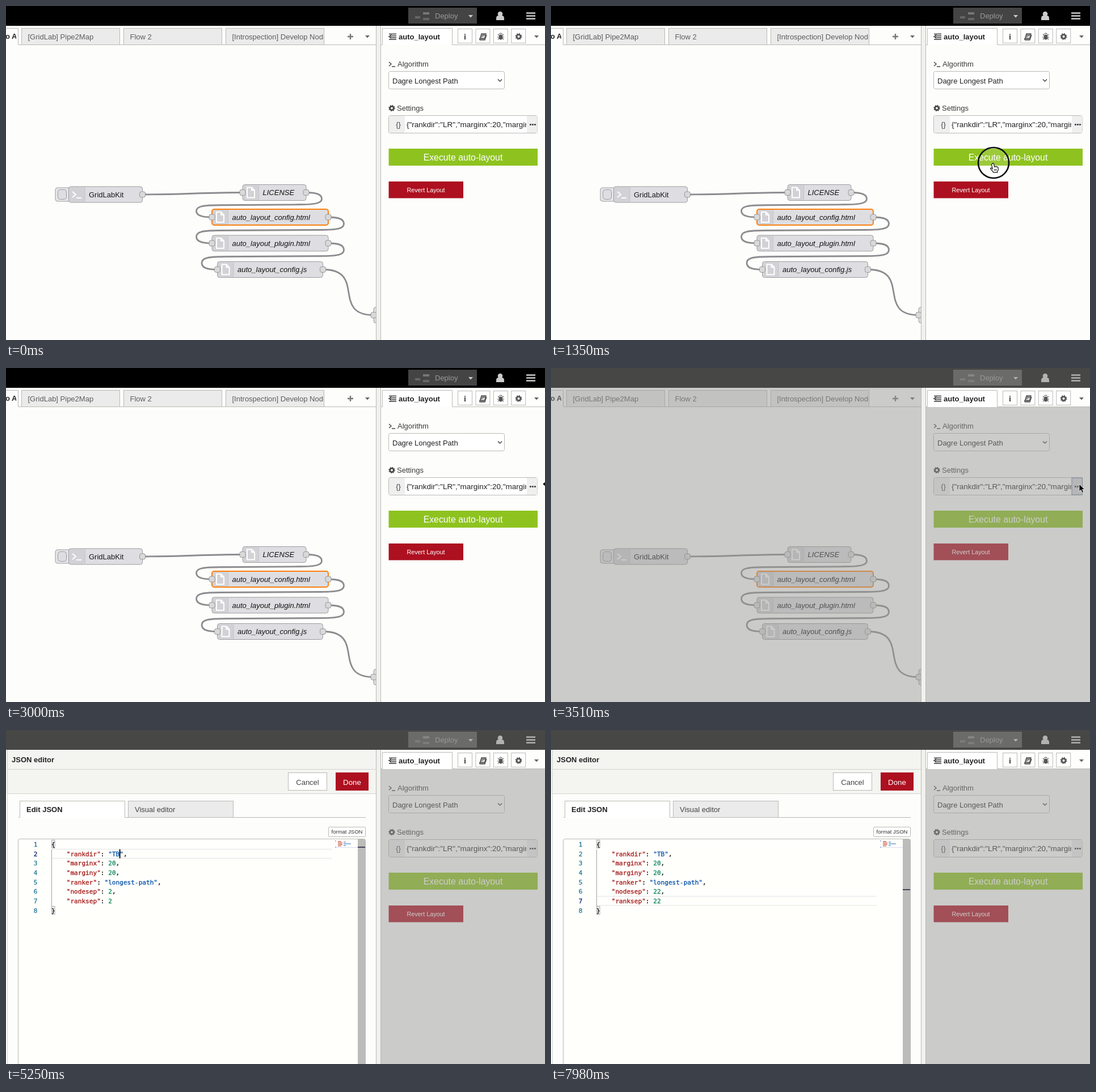
An HTML page for the animation above (8 s loop, 950 by 590 pixels).

```html
<!DOCTYPE html>
<html lang="en">
<head>
<meta charset="utf-8">
<title>Auto layout</title>
<style>
html, body { margin: 0; width: 100%; height: 100%; overflow: hidden; background: #fdfdfb; }
svg { display: block; width: 950px; height: 590px; }
svg svg { width: auto; height: auto; }
text { font: 13px "Liberation Sans", Arial, sans-serif; fill: #3a3a3a; white-space: pre; }
.b { font-weight: bold; fill: #222; }
.n { fill: #1a1a1a; }
.i { font-style: italic; fill: #111; }
.mono text { font: 11.1px "DejaVu Sans Mono", monospace; stroke-width: .3; }
.wire { fill: none; stroke: #8c8c90; stroke-width: 2.8; }
</style>
</head>
<body>
<svg id="stage" viewBox="0 0 950 590"></svg>
<script>
const LOOP = 8000, CHAR = 6.683, ROW = 16.67;
const LINE = '#b9b9b6', PALE = '#ebebeb', NODE = '#dedee2', EDGE = '#9b9b9f', PAPER = '#fdfdfb';
const $ = id => document.getElementById(id);

const rect = (x, y, w, h, fill, stroke = 'none', rx = 0, extra = '') =>
  `<rect x="${x}" y="${y}" width="${w}" height="${h}" fill="${fill}" stroke="${stroke}" rx="${rx}" ${extra}/>`;
const text = (x, y, s, attrs = '') => `<text x="${x}" y="${y}" ${attrs}>${s}</text>`;
const path = (d, stroke, width = 1, fill = 'none', extra = '') =>
  `<path d="${d}" stroke="${stroke}" stroke-width="${width}" fill="${fill}" ${extra}/>`;
const clipped = (x, y, w, h, body) =>
  `<svg x="${x}" y="${y}" width="${w}" height="${h}" style="width:${w}px;height:${h}px">${body}</svg>`;
const size = (px, fill, anchor = 'start') =>
  `style="font-size:${px}px;fill:${fill}" text-anchor="${anchor}"`;
const caretDown = (x, y, fill) => path(`M${x - 4} ${y - 2}h8l-4 4.5z`, 'none', 0, fill);
const gear = (x, y, r, fill) =>
  `<circle cx="${x}" cy="${y}" r="${r * .62}" fill="none" stroke="${fill}" stroke-width="${r * .5}"/>
   <circle cx="${x}" cy="${y}" r="${r * .92}" fill="none" stroke="${fill}" stroke-width="${r * .32}"
     stroke-dasharray="${r * .36}"/>`;

// Flow canvas
const port = (x, y) => rect(x - 5, y - 5, 10, 10, '#d9d9d9', '#97979a', 3);
const fileIcon = (x, y) => path(`M${x - 6} ${y - 9}h8l5 5v13h-13zM${x + 2} ${y - 9}v5h5`, '#fff', 2);

function node(x, y, w, label, icon, cls, stroke = EDGE) {
  return rect(x, y - 14, w, 28, NODE, stroke, 4, `stroke-width="${stroke === EDGE ? 1 : 2}"`) +
    rect(x + 1, y - 13, 28, 26, 'rgba(0,0,0,.05)', 'none', 3) +
    path(`M${x + 28.5} ${y - 13}v26`, '#c5c5c8') + icon +
    text(x + 35.5, y + 4.5, label, `class="${cls}"`) + port(x + w, y);
}

function backWire(x1, y1, x2, y2) {
  const m = (y1 + y2) / 2, r = x1 + 27.5, l = x2 - 27.5;
  return `<path class="wire" d="M${x1} ${y1}C${x1 + 18} ${y1} ${r} ${y1 + 3} ${r} ${(y1 + m) / 2}
    S${r - 10} ${m - .5} ${r - 42} ${m - .5}L${l + 42} ${m + .5}
    C${l + 10} ${m + .5} ${l} ${m + 3} ${l} ${(m + y2) / 2}S${x2 - 18} ${y2} ${x2} ${y2}"/>`;
}

function flow() {
  const files = [
    [417, 329.5, 112, 'LICENSE'],
    [363, 373, 205, 'auto_layout_config.html', '#ff7f0e'],
    [363, 419, 205, 'auto_layout_plugin.html'],
    [372.5, 465.5, 186, 'auto_layout_config.js']
  ];
  let s = '<path class="wire" d="M241 333C310 333 348 329.5 417 329.5M559 465.5C635 465.5 573 546 648 546"/>';
  for (let k = 0; k < 3; k++) {
    const [x, y, w] = files[k], [nx, ny] = files[k + 1];
    s += backWire(x + w, y, nx, ny);
  }
  s += rect(87, 321, 30, 24, '#e6e6e9', EDGE, 4) + rect(91.5, 324.5, 15, 17, NODE, EDGE, 4) +
    node(110.5, 333, 130, 'GridLabKit', path('M117 328l6 5-6 5M124 339h9', '#fff', 2), 'n');
  for (const [x, y, w, label, stroke] of files)
    s += node(x, y, w, label, fileIcon(x + 14, y), 'i', stroke) + port(x, y);
  return s + rect(648, 532, 60, 28, NODE, EDGE, 4) + port(648, 546);
}

function flowTabs() {
  const labels = ['[GridLab] Pipe2Map', 'Flow 2', '[Introspection] Develop Node'];
  let s = rect(0, 35, 653, 33, PAPER) + path('M21.5 68.5H653M21.5 68V39.5H0', LINE) +
    clipped(0, 36, 18, 32, text(-1, 22, 'o Auto', 'class="b"'));
  labels.forEach((label, k) => {
    const x = 27.5 + 180 * k;
    s += rect(x, 39.5, 173, 29, PALE, LINE) +
      clipped(x, 36, 172, 32, text(11, 22.5, label, 'style="fill:#5c5c5c"'));
  });
  return s + path('M602 54h10M607 49v10', '#777', 2.4) + caretDown(637, 54, '#666');
}

// Top bar and sidebar
function header() {
  return rect(0, 0, 950, 35, '#000') + rect(709, 3, 121, 28, '#444') +
    rect(721, 18, 9, 4, '#666') + rect(735, 11, 11, 4, '#777') + rect(735, 21, 11, 4, '#666') +
    text(756, 22, 'Deploy', 'style="fill:#999"') + caretDown(819, 18, '#ccc') +
    '<circle cx="871" cy="14" r="4.3" fill="#ccc"/>' +
    path('M864 25v-3q0-5 4-5h6q4 0 4 5v3z', 'none', 0, '#ccc') +
    path('M917 12.5h16M917 17.5h16M917 22.5h16', '#ccc', 2.4);
}

function sideTabs() {
  let s = rect(652, 35, 8, 555, '#f1f1ee') + rect(660, 35, 290, 34, '#fefefc') +
    path('M652.5 35V590M660.5 35V590', LINE) +
    path('M660 68.5h3.5V39.5h123v29H950', LINE, 1, '#fff') +
    path('M675 49.5h13M680 52.7h8M680 55.9h8M675 59h13M678.5 51.5v5l-3.5-2.5z', '#333', 1.5) +
    text(692, 58.5, 'auto_layout', 'class="b"');
  for (let k = 0; k < 4; k++) s += rect(796.5 + 31.4 * k, 40.5, 25, 25, '#fff', LINE);
  return s + text(809, 58.5, 'i', 'style="font:bold 14px \'Liberation Serif\',serif;fill:#444" text-anchor="middle"') +
    path('M838 49h8l-2.500 8h-8zM835 57q-1 3 1 3h8l3-9', '#555', 1.4, '#888') +
    '<ellipse cx="872" cy="55" rx="3.2" ry="4.5" fill="#555"/>' +
    path('M867 50l10 9M877 50l-10 9M866 55h12M870 50a2 2 0 0 1 4 0', '#555', 1.2) +
    gear(903.5, 54, 5.5, '#555') + caretDown(935, 54, '#666');
}

function sideBody() {
  return rect(661, 69, 289, 521, PAPER) +
    path('M675 99l4 3.5-4 3.5M680 107h6', '#444', 1.4) + text(690, 107, 'Algorithm') +
    rect(674.5, 115.5, 204, 31, '#fff', LINE, 3) +
    text(681, 136.5, 'Dagre Longest Path', 'style="fill:#222"') +
    path('M867 129.5l3.5 3.5 3.5-3.5', '#444', 1.5) +
    gear(680, 180.5, 5.3, '#444') + text(689, 185, 'Settings') +
    rect(674.5, 193.5, 262, 31, '#fff', LINE, 3) + rect(675, 194, 28, 30, '#efeff0', 'none', 3) +
    text(691.5, 214, '{}', size(13, '#444', 'middle')) +
    clipped(703, 194, 214, 30, text(3, 20, '{"rankdir":"LR","marginx":20,"marginy":20', size(13.5, '#222'))) +
    rect(918, 194, 18.5, 30, '#efeff0', 'none', 0, 'id="more"') +
    path('M923 209.5h11', '#333', 2.6, 'none', 'stroke-dasharray="2.8 1.2"') +
    rect(674.5, 252, 262.5, 30, '#8ec31f') + text(805.5, 273, 'Execute auto-layout', size(15.8, '#fff', 'middle')) +
    rect(674.5, 310, 131.5, 29.5, '#ad1020') + text(740, 329, 'Revert Layout', size(10.8, '#fff', 'middle'));
}

// JSON tray
function tray() {
  const mini = [[585, 6], [585, 8], [585, 8], [585, 6]];
  return rect(0, 35, 653, 555, PAPER) + rect(0, 35, 653, 77, '#f4f4f1') +
    path('M3 69.5h650M3 112.5h650M2.5 35v555', '#d2d2ce') +
    text(10, 56.5, 'JSON editor', 'class="b"') +
    rect(497.5, 75.5, 68, 31, '#fff', LINE) + text(531.5, 96.5, 'Cancel', size(13, '#444', 'middle')) +
    rect(581, 75, 58, 32, '#ad1020') + text(610, 96.5, 'Done', size(13.3, '#fff', 'middle')) +
    rect(215.5, 125.5, 185, 29, PALE, LINE) + text(227, 145, 'Visual editor', 'style="fill:#444"') +
    path('M22 154.5h2.5v-29h185v29H634', LINE, 1, '#fff') + text(36, 145, 'Edit JSON', 'class="b"') +
    rect(568.5, 171.5, 65, 17, '#fff', LINE, 1) + text(601, 183.3, 'format JSON', size(9.5, '#333', 'middle')) +
    rect(21.5, 192.5, 612, 420, '#fffffc', LINE, 3) + rect(620, 193, 13, 397, '#bcbcba') +
    '<g id="code" class="mono">' +
    mini.map(([x, w], k) => rect(x, 196 + k * 2.6, w, 1.7, '#d67a68')).join('') +
    path('M581 195v2M581 206v2M595 198h4M595 201h13M595 204h4', '#6f9fd0', 1.4) +
    path('M582 207.5h38', '#d8dcf0') + '<g id="lines"></g></g>';
}

// time, row, column, rankdir, nodesep, ranksep
const edits = [
  [3780, 2, 18, 'LR', 2, 2], [4300, 2, 17, 'L', 2, 2], [4460, 2, 16, '', 2, 2],
  [4800, 2, 17, 'T', 2, 2], [5000, 2, 18, 'TB', 2, 2], [5800, 3, 18, 'TB', 2, 2],
  [5950, 4, 18, 'TB', 2, 2], [6100, 5, 18, 'TB', 2, 2], [6250, 6, 17, 'TB', 2, 2],
  [6450, 6, 16, 'TB', 2, 2], [6650, 6, 17, 'TB', 22, 2], [7000, 7, 16, 'TB', 22, 2],
  [7250, 7, 17, 'TB', 22, 22]
];

function codeLines(t) {
  const [start, row, col, dir, nodesep, ranksep] = edits.filter(e => e[0] <= t).pop() || edits[0];
  const data = { rankdir: dir, marginx: 20, marginy: 20, ranker: 'longest-path', nodesep, ranksep };
  const ink = c => `style="fill:${c};stroke:${c}"`;
  const span = (s, c) => `<tspan ${ink(c)}>${s}</tspan>`;
  const body = Object.entries(data).map(([key, v], k) =>
    '    ' + span(`"${key}"`, '#a31515') + ': ' +
    (typeof v === 'string' ? span(`"${v}"`, '#0451a5') : span(v, '#098658')) + (k < 5 ? ',' : ''));
  const mid = n => 202 + (n - 1) * ROW;
  let s = path(`M81 ${mid(row) - 8.2}H574M81 ${mid(row) + 7.8}H574`, '#e2e2e4') +
    path('M80.5 211V311', '#a0a0a0') +
    rect(80.5, 194.5, 5.5, 14, '#eee', '#aaa') + rect(80.5, 311.5, 5.5, 14, '#eee', '#aaa');
  ['{', ...body, '}'].forEach((line, k) => {
    const n = k + 1, y = mid(n) + 4;
    s += text(55.5, y, n, `text-anchor="end" ${ink(n === row ? '#0b216f' : '#237893')}`) +
      text(80, y, line, ink('#111'));
  });
  s += rect(620, 191 + (row - 1) * 15, 13, 2, '#45455c');
  if ((t - start) % 1000 < 500) s += rect(80 + col * CHAR - .7, mid(row) - 8, 2, 16, '#111');
  return s;
}

// Pointer: time, x, y
const moves = [
  [600, 965, 430], [1050, 779, 278], [2460, 779, 278], [2850, 954, 205],
  [3050, 954, 205], [3320, 931, 205], [3560, 931, 205], [3840, 321, 268], [4300, 321, 268]
];
const pointers = {
  arrow: path('M0 0V13l3-2.7 2.2 5 2.4-1-2.2-4.9h4.2z', '#fff', .8, '#000'),
  hand: path('M-1 0q2-1 2.5 1l1 5q1-1 2 0 1-.8 2 .3 2-.6 2.4 1l.4 4-1.6 3v1.5h-7l-5-6.5q0-2 2.4-.8l1 1-1.6-7q-.2-1.2 1.5-1.5zM3 10v3M5.5 10v3', '#111', 1.2, '#fff'),
  ibeam: path('M-3.5-6.5q3.5 0 3.5 2v9q0 2-3.500 2M3.5-6.5q-3.500 0-3.500 2M0 4.5q0 2 3.5 2M-2 1.500h4', '#111', 1.3),
  resize: path('M-8 0l4-4v3h8v-3l4 4-4 4v-3h-8v3z', '#fff', .6, '#000')
};

function pointerAt(t) {
  const k = moves.findIndex(m => m[0] > t);
  if (k < 1) return null;
  const [t0, x0, y0] = moves[k - 1], [t1, x1, y1] = moves[k];
  const p = (t - t0) / (t1 - t0), e = p * p * (3 - 2 * p);
  return [x0 + (x1 - x0) * e, y0 + (y1 - y0) * e];
}

function pointerShape(x, y, t) {
  if (x > 944) return 'resize';
  if (t > 3740 && x < 620) return 'ibeam';
  return x > 674 && x < 937 && y > 252 && y < 282 ? 'hand' : 'arrow';
}

const shade = 'rgba(148,148,146,.48)';
$('stage').innerHTML =
  '<defs><clipPath id="left"><path d="M0 35H653V590H0z"/></clipPath></defs>' +
  rect(0, 0, 950, 590, PAPER) +
  `<g clip-path="url(#left)">${flow()}${flowTabs()}<g class="shade">${rect(0, 35, 653, 555, shade)}</g>` +
  `<g id="tray">${tray()}</g></g>` + header() + sideBody() +
  `<g class="shade">${rect(0, 0, 950, 35, shade)}${rect(661, 69, 289, 521, shade)}</g>` + sideTabs() +
  '<circle id="ring" cx="780" cy="277" r="27" fill="rgba(255,255,255,.12)" stroke="#0b0b12" stroke-width="2.6"/>' +
  '<g id="pointer"></g>';

const show = (el, on) => el.setAttribute('display', on ? 'inline' : 'none');
const shades = document.querySelectorAll('.shade');

function render(t) {
  shades.forEach(el => show(el, t >= 3480));
  const pressed = t >= 3420 && t < 3780;
  $('more').setAttribute('fill', pressed ? '#d5d5dc' : '#efeff0');
  $('more').setAttribute('stroke', pressed ? '#6a7f99' : 'none');

  const p = Math.min(1, Math.max(0, (t - 3530) / 250));
  show($('tray'), p > 0);
  $('tray').setAttribute('transform', `translate(${660 * (1 - p) ** 2} 0)`);
  show($('code'), t >= 3780);
  $('lines').innerHTML = t >= 3780 ? codeLines(t) : '';

  show($('ring'), t >= 1230 && t < 1470);
  const at = pointerAt(t);
  $('pointer').innerHTML = at ? pointers[pointerShape(...at, t)] : '';
  if (at) $('pointer').setAttribute('transform', `translate(${at})`);
}

function tick() {
  render(performance.now() % LOOP);
  requestAnimationFrame(tick);
}
tick();
</script>
</body>
</html>
```
